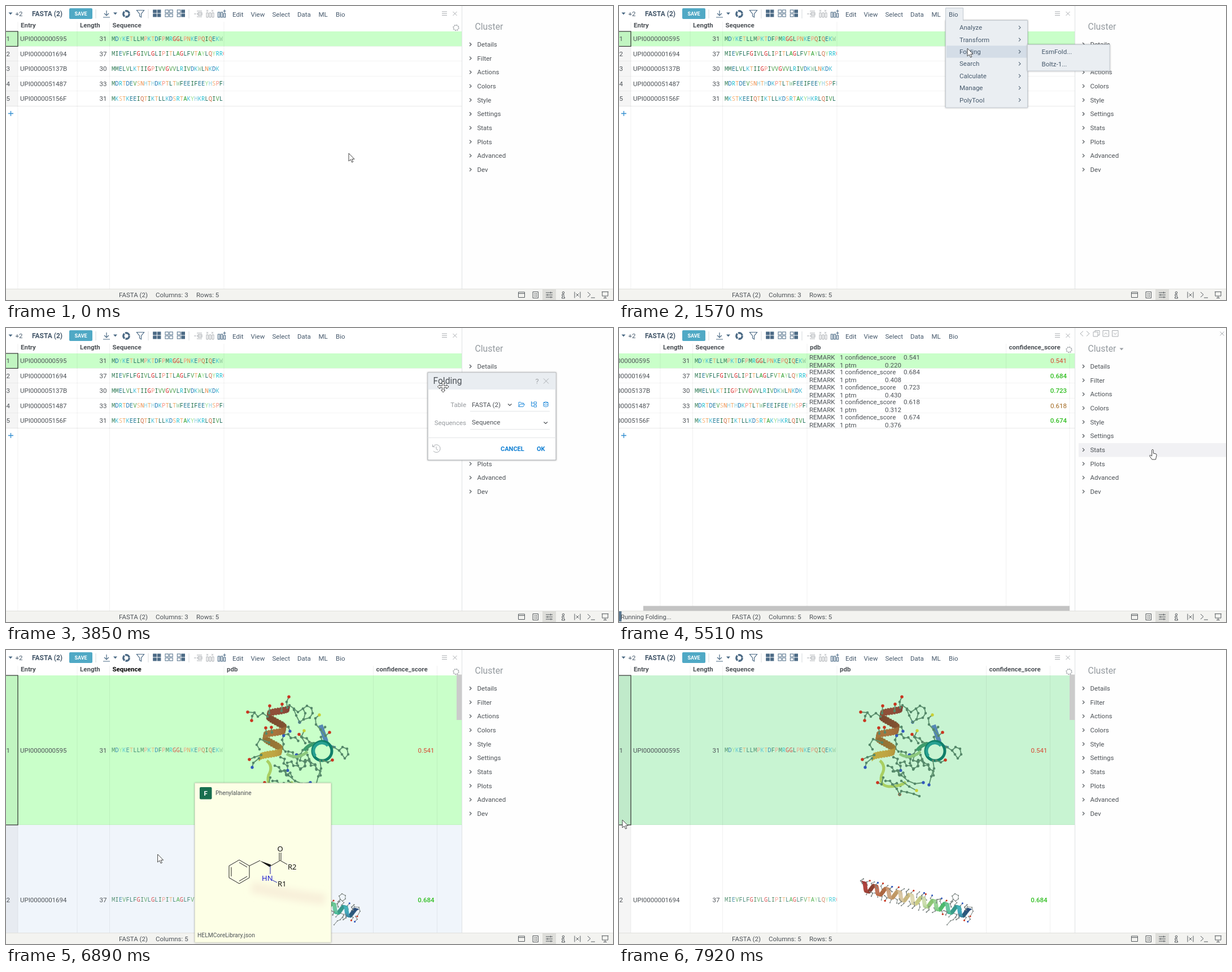
An HTML page for the animation above (8 s loop, 1075 px wide and 521 px high).

```html
<!DOCTYPE html>
<html lang="en">
<head>
<meta charset="utf-8">
<title>Folding</title>
<style>
html, body { margin: 0; height: 100%; overflow: hidden; background: #fff; }
svg { font: 11.5px Roboto, sans-serif; fill: #4d5257; }
#stage { display: block; width: 100%; height: 100%; }
.b { font-weight: 700; }
.seq { font: 10.6px "Noto Sans Mono", monospace; white-space: pre; }
#tall .seq { opacity: .8; }
.tool { fill: #46596c; }
.i { fill: none; stroke: #4b6a85; stroke-width: 1.2; }
.g { fill: none; stroke: #a9adb1; stroke-width: 1; }
.blue { fill: none; stroke: #2b8fdc; stroke-width: 1; }
.chem { font: 13px "Noto Sans", sans-serif; fill: #111; }
</style>
</head>
<body>
<svg id="stage" viewBox="0 0 1075 521" preserveAspectRatio="none"></svg>
<script>
const LOOP = 8000;
const text = (x, y, s, attrs = '') => `<text x="${x}" y="${y}" ${attrs}>${s}</text>`;
const rect = (x, y, w, h, fill, attrs = '') => `<rect x="${x}" y="${y}" width="${w}" height="${h}" fill="${fill}" ${attrs}/>`;
const path = (d, attrs = 'class="i"') => `<path d="${d}" ${attrs}/>`;
const group = (id, ...parts) => `<g id="${id}">${parts.join('')}</g>`;
const caret = (x, y, fill = '#4b6a85') => path(`M${x - 3.5} ${y - 2}h7l-3.5 4z`, `fill="${fill}"`);
const cross = (x, y, r = 3.5) => path(`M${x - r} ${y - r}l${2 * r} ${2 * r}m0 ${-2 * r}l${-2 * r} ${2 * r}`, 'class="g"');
const chevron = (x, y, color = '#4d5257') => path(`M${x} ${y - 3}l3 3l-3 3`, `fill="none" stroke="${color}" stroke-width="1.2"`);

let seed = 11;
const rand = () => (seed = seed * 16807 % 2147483647) / 2147483647;

// ---- table ----
const residues = {
  A: '#2ca02c', V: '#4aa04a', I: '#176739', L: '#1e6e60', M: '#3c835f', F: '#186e4f', Y: '#98df8a', W: '#8fc79a',
  G: '#d62728', P: '#f78f80', R: '#17becf', H: '#8fd0de', K: '#45bfd6', D: '#1f77b4', E: '#1f7896',
  S: '#f5b378', T: '#f0a764', N: '#eb8946', Q: '#cd6f47'
};
const records = [
  ['UPI0000000595', 31, 'MDYKETLLMPKTDFPMRGGLPNKEPQIQEKW', 0.541, 0.220, '#d8452f'],
  ['UPI0000001694', 37, 'MIEVFLFGIVLGLIPITLAGLFVTAYLQYRRG', 0.684, 0.408, '#2fbe20'],
  ['UPI000005137B', 30, 'MMELVLKTIIGPIVVGVVLRIVDKWLNKDK', 0.723, 0.430, '#2fbe20'],
  ['UPI0000051487', 33, 'MDRTDEVSNHTHDKPTLTWFEEIFEEYHSPFE', 0.618, 0.312, '#a0661c'],
  ['UPI000005156F', 31, 'MKSTKEEIQTIKTLLKDSRTAKYHKRLQIVL', 0.674, 0.376, '#2fbe20']
];
const titles = ['Entry', 'Length', 'Sequence', 'pdb', 'confidence_score'];
const sequence = s => [...s].map(c => `<tspan fill="${residues[c]}">${c}</tspan>`).join('');

function remark(x, y, score, ptm) {
  return text(x, y + 10.8, 'REMARK') + text(x + 54, y + 10.8, '1 confidence_score') + text(x + 167, y + 10.8, score.toFixed(3)) +
    text(x, y + 24.8, 'REMARK') + text(x + 54, y + 24.8, '1 ptm') + text(x + 134, y + 24.8, ptm.toFixed(3));
}

function grid(id, edges, rowHeight, withText) {
  const numbered = edges[0] > 0;
  let out = '';
  records.forEach(([entry, length, seq, score, ptm, color], i) => {
    const top = 45 + i * rowHeight, base = top + rowHeight / 2 + 4;
    if (top > 501) return;
    out += rect(0, top, 807, rowHeight, i ? '#fff' : '#c9ffc9', `id="${id}row${i}"`);
    if (numbered) out += rect(0, top, 21, rowHeight, '#000', 'opacity=".04"') + text(.5, base, i + 1);
    out += path(`M0 ${top + rowHeight}H807`, 'stroke="#000" stroke-opacity=".09"');
    out += text(edges[0] + 4, base, entry) + text(edges[2] - 5, base, length, 'text-anchor="end"');
    out += `<svg x="${edges[2]}" y="${top}" width="202" height="${rowHeight}">${text(3.5, rowHeight / 2 + 3.5, sequence(seq), 'class="seq"')}</svg>`;
    if (edges.length > 4) {
      out += text(edges[5] - 5, base, score.toFixed(3), `text-anchor="end" fill="${color}" font-weight="${score > .65 ? 500 : 400}"`);
      if (withText) out += remark(edges[3] + 4, top, score, ptm);
    }
  });
  edges.forEach((x, i) => {
    if (x > 0) out += path(`M${x} 28V501`, 'stroke="#000" stroke-opacity=".06"');
    if (i < edges.length - 1) out += text(x + 5, 38, titles[i], `class="b" id="${id}head${i}"`);
  });
  if (numbered) out += rect(-1, 45, 22, rowHeight, 'none', 'stroke="#333" stroke-width="1.2"');
  if (rowHeight < 100) out += path('M4 190.5h9M8.5 186v9', 'stroke="#2f8ccf" stroke-width="1.3"');
  return out;
}

// ---- molecules ----
const atom = (id, color, r) => `<marker id="${id}" markerWidth="4" markerHeight="4" refX="2" refY="2"><circle cx="2" cy="2" r="${r}" fill="${color}"/></marker>`;
const bond = (points, tip, body = 'C') =>
  `<polyline points="${points}" marker-start="url(#${body})" marker-mid="url(#${body})" marker-end="url(#${tip})"/>`;
const ribbon = (d, color, width) => path(d, `fill="none" stroke="${color}" stroke-width="${width}"`);
const sticks = (color, width, parts) => `<g fill="none" stroke="${color}" stroke-width="${width}">${parts.join('')}</g>`;

function wander(x, y, angle, steps, size) {
  const points = [];
  for (let i = 0; i <= steps; i++) {
    points.push(`${x.toFixed(1)},${y.toFixed(1)}`);
    const a = angle + (i % 2 ? .6 : -.5) + (rand() - .5) * .6;
    x += Math.cos(a) * size;
    y += Math.sin(a) * size;
  }
  return points.join(' ');
}

// A band wound around the axis from (x0, y0) to (x1, y1): narrow strips laid along the axis, far side first.
function coil([x0, y0], [x1, y1], turns, radius, half, color) {
  const length = Math.hypot(x1 - x0, y1 - y0), ux = (x1 - x0) / length, uy = (y1 - y0) / length;
  const far = [], near = [], steps = Math.round(turns * 24);
  for (let k = 0; k <= steps; k++) {
    const u = k / steps, a = u * turns * 2 * Math.PI, side = radius * Math.cos(a), depth = Math.sin(a);
    const x = x0 + u * (x1 - x0) + side * uy, y = y0 + u * (y1 - y0) - side * ux;
    const strip = `<path d="M${x - half * ux} ${y - half * uy}L${x + half * ux} ${y + half * uy}" stroke-width="${
      (radius * .28 * Math.abs(depth) + 1.6).toFixed(1)}" stroke="${color(u, depth)}"/>`;
    (depth < 0 ? far : near).push(strip);
  }
  return `<g fill="none">${far.join('')}${near.join('')}</g>`;
}

function globule() {
  const chains = {
    O: ['463,118 455,112 446,118 440,111 428,110', '440,111 436,117 435,125', '498,102 497,92 501,83', '466,112 467,99',
      '488,108 489,96', '461,148 460,138', '471,146 470,137', '557,141 566,152 573,146', '452,186 440,190 431,194',
      '468,226 465,238 458,235', '484,238 492,246 497,256', '562,196 570,199 578,195'],
    N: ['510,106 514,116 520,128', '448,192 438,200 436,208', '556,196 558,210 553,224 549,239', '500,222 512,232 524,237 539,235'],
    S: ['557,141 549,132 548,121 555,115', '530,165 523,154 528,143', '500,232 514,242 527,249'],
    C: ['502,98 510,104 517,110 526,104 530,112 527,123 520,128', '526,104 533,99 541,103 543,112 538,120 527,123',
      '580,172 590,178 596,172 604,175 606,185 600,192 595,185 590,178', '466,164 450,158 444,168 449,176',
      '497,256 500,250 510,252 522,255 532,259']
  };
  const inner = [[486, 190, 1.2], [492, 150, .4], [500, 180, .9], [498, 200, .4], [515, 185, 1], [534, 186, 2], [545, 165, 3.6],
    [476, 205, .6], [472, 232, .2], [530, 195, .5], [538, 170, 2.4], [560, 162, -1.6], [495, 180, -1.6], [482, 128, .7], [485, 215, .3], [540, 200, .8]]
    .map(([x, y, a]) => bond(wander(x, y, a, 4, 8), 'CCNCO'[rand() * 5 | 0]));
  const outer = Object.entries(chains).flatMap(([tip, list]) => list.map(p => bond(p, tip)));
  return sticks('#5f9470', 1.9, inner) +
    coil([484, 99], [467, 194], 2.5, 18, 6, (u, depth) => `hsl(${10 + u * 42} ${42 + 8 * u}% ${(depth < 0 ? 30 : 34 + 4 * depth) + u * 14}%)`) +
    ribbon('M462 196Q474 206 465 222Q460 240 478 242Q498 242 508 234', '#a9cf62', 5) + ribbon('M497 184Q515 196 534 180', '#8cc77c', 5) +
    ribbon('M557 133L567 162', '#5588b4', 8) + ribbon('M567 160Q574 174 584 172', '#4b86a4', 4) +
    ribbon('M528 178Q536 166 552 166', '#3f9c6c', 6) +
    '<g fill="none"><circle cx="560" cy="179" r="17" stroke="#0f7f69" stroke-width="5"/><path d="M548 188A13 13 0 0 1 570 170" stroke="#27a092" stroke-width="5"/></g>' +
    sticks('#5f9470', 1.9, outer);
}

function helix() {
  const axis = u => [431 + u * 188, 419 + u * 48 - 4 * Math.sin(u * 2 * Math.PI) * (u - .5)];
  const side = Array.from({ length: 44 }, (_, k) => {
    const [x, y] = axis(k / 43), way = k % 2 ? 1 : -1;
    return bond(wander(x, y + way * 5, way * 1.5 + (rand() - .5), 2, 6), 'GGONG'[rand() * 5 | 0], 'G');
  });
  const rings = [bond('588,446 592,442 590,436 595,432 601,435 601,441 596,445 592,442', 'G', 'G'),
    bond('612,462 617,455 625,456 627,463 622,472', 'O', 'G'), bond('598,470 592,478 587,480 581,487', 'G', 'G')];
  const tint = (u, depth) => {
    const pale = Math.sin(Math.PI * u) ** 1.5;
    return `hsl(${u < .5 ? u * 110 : 55 + (u - .5) * 320} ${48 - 8 * pale}% ${(depth < 0 ? 32 : 38 + 8 * depth) + 34 * pale}%)`;
  };
  return sticks('#868e8b', 1.1, side.concat(rings)) + coil(axis(0), axis(1), 9, 8.5, 3.6, tint) + sticks('#868e8b', 1.1, side.filter((_, k) => k % 3 === 0));
}

// ---- fixed interface ----
function toolbar() {
  let out = caret(8, 13.5) + text(16.5, 17.5, '+2', 'class="tool"') + text(46, 17.5, 'FASTA (2)', 'class="tool b" font-size="12"');
  out += rect(112, 4, 41, 19, '#50a9c5', 'rx="2"') + text(132.5, 16.8, 'SAVE', 'class="b" fill="#fff" font-size="9" text-anchor="middle"');
  out += path('M159 6v16M252 6v16M324 6v16', 'stroke="#d5d9dc"');
  out += path('M178 8v9m-4-4l4 4l4-4M172 20h12') + caret(193.5, 13.5);
  out += '<circle cx="213" cy="14" r="5.2" fill="none" stroke="#4b6a85" stroke-width="3.4" stroke-dasharray="9.5 1.4"/>';
  out += path('M231.5 7.5h13l-5 6.5v6l-3-2v-4z');
  [15, 0, 10].forEach((mask, n) => {
    for (let c = 0; c < 4; c++)
      out += rect(260.7 + n * 21.3 + c % 2 * 7.6, 7 + (c >> 1) * 7, 5.6, 5, mask >> c & 1 ? '#4b6a85' : 'none', 'stroke="#4b6a85"');
  });
  out += path('M338 9h9M338 14h9M338 19h9M333 14h4M340 11.5h7v5h-7z', 'class="g"');
  out += path('M355 12h3v8h-3zM360 12h3v8h-3zM365 12h3v8h-3zM355 7l3 3m0-3l-3 3M364 7l3 3m0-3l-3 3', 'class="g"');
  out += path('M375.5 11h3v9h-3zM380.5 11h3v9h-3zM385.5 13h3v7h-3zM387 6.5v5M384.5 9h5');
  [[401, 'Edit'], [433.5, 'View'], [471.5, 'Select'], [516, 'Data'], [553.5, 'ML']].forEach(([x, s]) => out += text(x, 18.7, s, 'class="tool"'));
  return out + path('M772 10h9M772 13.3h9M772 16.6h9', 'class="g"') + cross(795, 13.5);
}

const sections = ['Details', 'Filter', 'Actions', 'Colors', 'Style', 'Settings', 'Stats', 'Plots', 'Advanced', 'Dev'];
const panel = () => rect(807, 0, 268, 501, '#fefefe') + path('M807.5 0V501', 'stroke="#dfe1e3"') +
  group('panelHover', rect(814, 204, 261, 24.5, '#f1f1f4'), caret(890, 37.5, '#9a9fa4'),
    path('M822 5.5l-5 4.5l5 4.5M828 5.5l5 4.5l-5 4.5M840 7h8v8h-8zM843 7v-2.5h8v8h-3M857 4.5h10.5v10.5h-10.5zM859.5 11.5l2.7-3l2.7 3M873.5 4.5h10.5v10.5h-10.5zM876 8.5l2.7 3l2.7-3', 'class="g"'),
    cross(1068, 10)) +
  text(830.5, 42, 'Cluster', 'font-size="15.8" fill="#949a9f"') +
  sections.map((s, i) => chevron(821, 68 + i * 24.65) + text(834.5, 72 + i * 24.65, s)).join('');

const status = () => rect(0, 501, 1075, 20, '#f3f3f0') + path('M0 501.5H1075', 'stroke="#e0e0dd"') +
  text(200, 516, 'FASTA (2)') + text(265, 516, 'Columns: 3', 'id="columns"') + text(337, 516, 'Rows: 5') +
  group('bar', rect(0, 502, 4.5, 18, '#5b7890')) + text(3, 516, 'Running Folding...', 'id="running" font-size="11.3"') +
  rect(950, 502, 24, 19, '#dededa') +
  path('M907.5 507h11v9.5h-11zM907.5 509.5h11M933 506.5h9.5v11h-9.5zM935 509.5h1.5m1 0h3M935 512h1.5m1 0h3M935 514.5h1.5m1 0h3' +
    'M956 508h12M956 512h12M956 516h12M964.5 506.5v3M959 510.5v3M965 514.5v3M985 511h3v5h1.5v2h-5v-2h1v-3h-1z' +
    'M1007 506.5v11M1017 506.5v11M1009.5 509.5l5 5m0-5l-5 5M1030 507l5 4.5l-5 4.5M1036 517h7' +
    'M1055 506.5h12M1056 506.5v7.5h10v-7.5M1061 514v3.5M1058 517.5h6', 'fill="none" stroke="#555a5e"') +
  '<circle cx="987" cy="508" r="1.8" fill="none" stroke="#555a5e"/>';

const menuItems = ['Analyze', 'Transform', 'Folding', 'Search', 'Calculate', 'Manage', 'PolyTool'];
const box = 'stroke="#c3cad1" filter="url(#soft)"';
const menu = () => group('menu', rect(578.5, 25.5, 145, 154.5, '#eaeef2', box), path('M578.5 26V3.5H609.5V26', 'fill="#eaeef2" stroke="#c3cad1"'),
  rect(580, 70.3, 142, 21.4, '#d4dde7', 'id="menuMark"'),
  ...menuItems.map((s, i) => text(603, 42.2 + i * 21.4, s, 'class="tool"') + chevron(708, 38.2 + i * 21.4, '#5d6e7e')),
  group('submenu', rect(723.5, 68.5, 145.5, 46.5, '#eaeef2', box), rect(725, 91.5, 142, 21.4, '#d4dde7', 'id="subMark"'),
    text(748.5, 85.2, 'EsmFold...', 'class="tool"'), text(748.5, 106.6, 'Boltz-1...', 'class="tool"')));

const button = (x, s) => text(x, 218, s, 'class="b" fill="#0f7fd3" font-size="11"');
const dialog = () => group('dialog', rect(747, 79, 227, 155, '#fff', 'stroke="#a4a8ac" filter="url(#soft)"'), rect(747.5, 79.5, 226, 29.5, '#e9edf1'),
  text(756.5, 99, 'Folding', 'font-size="15.6"'), text(937.5, 98.5, '?', 'font-size="13" fill="#a0a4a8"'), cross(956.5, 94, 4.5),
  text(815, 140, 'Table', 'text-anchor="end" fill="#969a9e"'), text(825, 140, 'FASTA (2)'),
  text(815, 171.5, 'Sequences', 'text-anchor="end" fill="#969a9e"'), text(825, 171, 'Sequence'),
  path('M822 147.5H963M822 179.5H963M747 194.5H974', 'stroke="#e3e5e7"'),
  path('M889 134.5l3.2 3l3.2-3M952.5 166.5l3.2 3l3.2-3', 'fill="none" stroke="#4d5257" stroke-width="1.2"'),
  path('M908 139.5v-8h3.5l1 1.5h4v2M908 139.5l2.5-4.5h8l-2.5 4.5zM930.5 130v8.5h4M930.5 133h4M935 131h4.5v3.5h-4.5zM935 136.5h4.5v3.5h-4.5z' +
    'M952 132v6.5q4 2.5 8 0v-6.5q-4-2.5-8 0q4 2.5 8 0M952 135.5q4 2.5 8 0', 'class="blue"'),
  path('M756.5 210A6.8 6.8 0 1 1 757 218M755.5 206.5v4h4M762 210v4.5l3 2', 'class="g"'),
  button(876, 'CANCEL'), button(940, 'OK'));

const tooltip = () => group('tooltip', rect(334.5, 236, 241, 282, '#fdffe6', 'stroke="#dfe2cc" filter="url(#soft)"'),
  path('M435 420Q500 435 565 442', 'fill="none" stroke="#f8f0da" stroke-width="20" filter="url(#blur)"'),
  rect(343, 243, 21.5, 21.5, '#186e4f', 'rx="2"'), text(353.7, 258, 'F', 'class="b" text-anchor="middle" fill="#fff"'),
  text(371, 257, 'Phenylalanine', 'font-size="10.3"'), text(339, 509, 'HELMCoreLibrary.json', 'font-size="10.3"'),
  path('M413 372l18 10.5v21l-18 10.5l-18-10.5v-21zM413 376.5l14 8.3M427 401.2l-14 8.3M399 401.2v-16.4M431 382.5L450 373M468 383L485.5 373L498 380M484 373v-14M487 373v-14', 'fill="none" stroke="#222"'),
  path('M449.5 373.5L467 384.5L469.5 380.5z', 'fill="#111"'), path('M468 383v14M472 408l8 4', 'stroke="#1a1aa8"'),
  text(485.5, 357, 'O', 'class="chem" text-anchor="middle"'), text(499, 388.5, 'R2', 'class="chem"'),
  text(481, 419, 'R1', 'class="chem"'), text(453, 409, 'HN', 'class="chem" style="fill:#1a1ad0"'));

const cursorStyle = 'fill="#fff" stroke="#444" stroke-linejoin="round"';
const cursor = () => group('cursor',
  group('arrow', path('M0 0V14L3.3 11L5.6 16L7.8 15L5.6 10.3H10Z', cursorStyle)),
  group('hand', path('M-1.3 10V1.2Q0-1 1.3 1.2V7L6 8Q7.5 8.5 7 11L5.5 18H-1L-5.5 11.5Q-5 9-1.3 12Z', cursorStyle)),
  group('move', path('M0-10l3.5 4h-2v4.5h4.5v-2l4 3.5l-4 3.5v-2h-4.5v4.5h2l-3.5 4l-3.5-4h2v-4.5h-4.5v2l-4-3.5l4-3.5v2h4.5v-4.5h-2z', cursorStyle)));

document.getElementById('stage').innerHTML = `<defs>
  ${atom('C', '#55886a', 1.2)}${atom('G', '#7d8583', 1)}${atom('O', '#c9351f', 1.45)}${atom('N', '#3159bd', 1.4)}${atom('S', '#c9cf35', 1.4)}
  <filter id="soft" x="-10%" y="-10%" width="120%" height="120%"><feDropShadow dx="0" dy="0" stdDeviation="1.5" flood-opacity=".35"/></filter>
  <filter id="blur" x="-20%" y="-100%" width="140%" height="300%"><feGaussianBlur stdDeviation="6"/></filter></defs>` +
  rect(0, 0, 1075, 521, '#fff') +
  group('before', grid('a', [21, 126, 183.5, 386], 26.5)) +
  group('scrolled', grid('b', [-32, 73, 130.5, 333, 685.5, 798], 26.5, true), rect(43, 492.5, 755, 8.5, '#c3c3c3')) +
  group('tall', grid('c', [21, 126, 183.5, 386, 650.5, 763.5], 265), group('globule', globule()), group('helix', helix()),
    rect(798, 43.5, 9, 80.5, '#cbcbcb')) +
  group('gear', '<circle cx="797" cy="38.5" r="4.3" class="g"/><circle cx="797" cy="38.5" r="5" fill="none" stroke="#a9adb1" stroke-width="1.5" stroke-dasharray="1.9 2"/>') +
  panel() + toolbar() + status() + menu() + text(584, 18.7, 'Bio', 'class="tool"') + dialog() + tooltip() + cursor();

// ---- motion ----
const $ = id => document.getElementById(id);
const show = (id, on) => $(id).style.display = on ? '' : 'none';
const track = [[0, 607, 261], [260, 607, 261], [880, 592, 14], [1100, 592, 14], [1570, 617, 75], [1850, 620, 82], [2180, 620, 82],
  [2730, 760, 94], [2929, 760, 94], [2930, 769, 95], [3389, 769, 95], [3390, 774, 104], [3850, 774, 104], [4610, 945, 215],
  [6660, 945, 215], [6790, 322, 436], [6820, 322, 436], [6890, 269, 362], [7300, 93, 378], [7430, 72, 374], [7830, 6, 301], [LOOP, 6, 301]];

function pointer(t) {
  const i = track.findIndex(k => k[0] > t), [t0, x0, y0] = track[i - 1], [t1, x1, y1] = track[i];
  const f = (t - t0) / (t1 - t0);
  return [x0 + (x1 - x0) * f, y0 + (y1 - y0) * f];
}

function draw(now) {
  const t = now % LOOP, [x, y] = pointer(t);
  const within = (from, to) => t >= from && t < to;

  show('before', t < 5090);
  show('scrolled', within(5090, 5580));
  show('tall', t >= 5580);
  show('globule', t >= 5650);
  show('helix', t >= 5850);
  show('gear', t < 800 || t >= 4810);
  show('panelHover', within(4810, 6680));
  show('bar', within(4810, 5920));
  show('running', within(4810, 6140));
  $('columns').textContent = `Columns: ${t < 5090 ? 3 : 5}`;

  const item = Math.floor((y - 27.5) / 21.4);
  show('menu', within(960, 3130));
  show('menuMark', item >= 0);
  $('menuMark').setAttribute('y', 27.5 + 21.4 * Math.min(item, 2));
  show('submenu', item >= 2);
  show('subMark', x > 724);
  $('subMark').setAttribute('y', y < 91.5 ? 70.3 : 91.5);

  show('dialog', within(3390, 4810));
  show('tooltip', within(6800, 6960));

  const inGrid = t >= 6680 && x < 807;
  $('crow0').setAttribute('fill', inGrid && y < 310 ? '#c8f4d2' : '#c9ffc9');
  $('crow1').setAttribute('fill', inGrid && y >= 310 ? '#f0f5fb' : '#fff');
  const lagX = pointer(Math.max(0, t - 90))[0];
  [21, 126, 183.5, 386, 650.5].forEach((left, i, all) =>
    $(`chead${i}`).style.fill = inGrid && lagX >= left && lagX < (all[i + 1] || 763) ? '#000' : '');

  let kind = 'arrow';
  if (within(3390, 4810)) kind = y < 109 ? 'move' : y > 203 ? 'hand' : 'arrow';
  else if (within(4810, 6680)) kind = 'hand';
  ['arrow', 'hand', 'move'].forEach(k => show(k, k === kind));
  $('cursor').setAttribute('transform', `translate(${x.toFixed(1)} ${y.toFixed(1)})`);
}

(function frame() {
  draw(performance.now());
  requestAnimationFrame(frame);
})();
</script>
</body>
</html>
```
